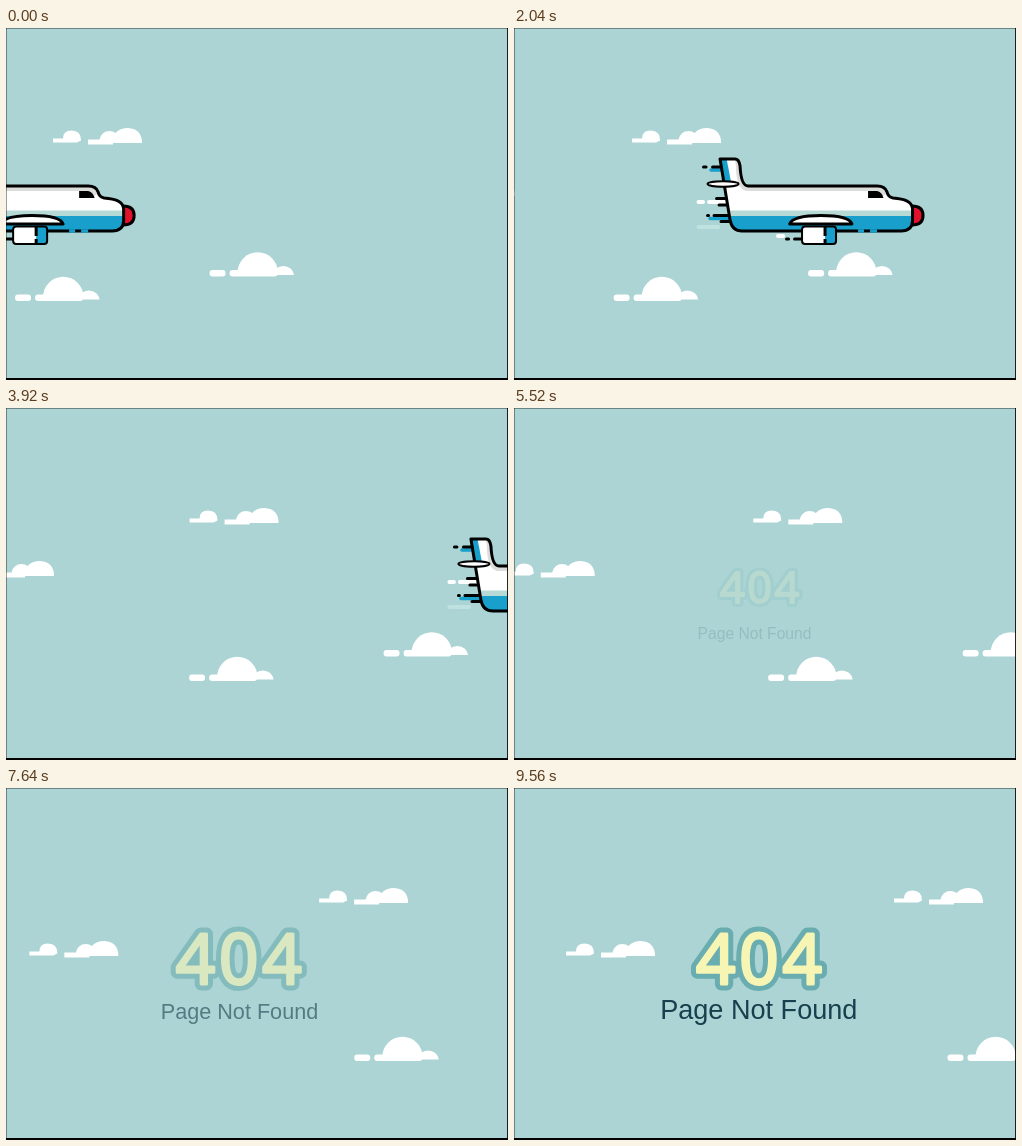
Animation, 502 px wide and 352 px high, one loop 9.6 s. Source, as an HTML page:

```html
<!DOCTYPE html>
<html lang="en">
<head>
<meta charset="utf-8">
<title>Page Not Found</title>
<style>
  html, body { margin: 0; width: 100%; height: 100%; overflow: hidden; background: #acd4d4; }
  svg { display: block; width: 502px; height: 352px; }
  text { text-anchor: middle; }
  .code { font: 69px "Open Sans", sans-serif; letter-spacing: 3.8px; stroke-linejoin: round; }
  .message { font: 27.2px "Liberation Sans", Arial, sans-serif; fill: #163f4e; }
  .line { fill: none; stroke: #000; stroke-width: 3; stroke-linecap: round; stroke-linejoin: round; }
</style>
</head>
<body>
<svg viewBox="0 0 502 352">
  <defs>
    <g id="wisp" fill="#fff">
      <path d="M0 10.5H10Q10 2.5 18.500 2.500Q28 2.500 28 12.500L24 14.500H0Z"/>
      <path d="M35 11.500H46.500Q48.500 3 56.500 3Q60 3 62.500 5Q67 0 75 0Q89 1 89 15H60V16.500H35Z"/>
    </g>
    <g id="puff" fill="#fff">
      <rect y="17.500" width="16" height="6.500" rx="3"/>
      <rect x="20" y="17.500" width="48" height="6.500" rx="3"/>
      <path d="M28 20A20.200 20.200 0 0 1 68.400 20V22H28Z"/>
      <path d="M63 22.500A10.800 10 0 0 1 84.500 22.500Z"/>
    </g>
    <path id="hull" d="M85 131H100Q104 131 105 138Q106 158 113 158H242Q250 158 252 164Q253 169 258 170C269 171 277 173 277.500 181V193Q277 203 266 203H107Q97 203 95 192Z"/>
    <clipPath id="inside"><use href="#hull"/></clipPath>
  </defs>

  <rect width="502" height="352" fill="#acd4d4"/>
  <use id="wispFar" href="#wisp"/>
  <use id="wispNear" href="#wisp"/>
  <use id="puffLow" href="#puff"/>
  <use id="puffHigh" href="#puff"/>

  <g id="plane">
    <g fill="none" stroke-width="3.500" stroke-linecap="round">
      <path stroke="#199fcb" d="M76 142H90M75 190.500H97"/>
      <path stroke="#fff" stroke-width="4" d="M63.500 174H68M74 174H90M143 208H148"/>
      <path stroke="#bfe2e1" stroke-width="4" d="M63.500 199H83"/>
    </g>
    <path d="M277 178Q288 178 288 187.500Q288 197 277 197Z" fill="#e2122d" stroke="#000" stroke-width="3"/>
    <g clip-path="url(#inside)">
      <rect x="80" y="128" width="200" height="78" fill="#fff"/>
      <path d="M99 130Q101 134 101 142Q102 163 113 163H242Q246 163 248 168L260 160L240 150H112L106 130Z" fill="#dcdddb"/>
      <path d="M80 128H91L96 154H80Z" fill="#199fcb"/>
      <rect x="80" y="182.500" width="200" height="5.500" fill="#b7dad7"/>
      <rect x="80" y="188" width="200" height="18" fill="#199fcb"/>
    </g>
    <use href="#hull" class="line"/>
    <path d="M223 203H229M235 203H242" stroke="#199fcb" stroke-width="3.500"/>
    <path d="M233 163H242Q247 164 248.500 170H233Z"/>
    <path class="line" d="M68.500 139H71M77.500 139H86M81.500 170.500H91M84 177H92M72.500 187.500H73.500M79 187.500H93M86 193.500H95M151.500 211H153.500M159.500 211H167"/>
    <ellipse cx="88" cy="156" rx="15.500" ry="2.700" fill="#fff" stroke="#000" stroke-width="2"/>
    <rect x="167" y="199" width="34" height="17" rx="3" fill="#fff"/>
    <path d="M190 199H198Q201 199 201 202V213Q201 216 198 216H190Z" fill="#199fcb"/>
    <path d="M190 199V208M190 211V215" stroke="#000" stroke-width="3"/>
    <rect x="167" y="198.500" width="34" height="17.500" rx="3" fill="none" stroke="#000" stroke-width="2"/>
    <path d="M154.500 196Q158 187.500 186 187.500Q214 187.500 217 196Z" fill="#fff" stroke="#000" stroke-width="2.800" stroke-linejoin="round"/>
  </g>

  <g id="code" class="code">
    <text x="2" y="25" fill="#69adb0" stroke="#69adb0" stroke-width="13">404</text>
    <text x="2" y="25" fill="#f8f6b4" stroke="#f8f6b4" stroke-width="3">404</text>
  </g>
  <text id="message" class="message">Page Not Found</text>

  <path d="M0 .5H502M.5 0V352" stroke="#000" stroke-opacity=".38"/>
  <path d="M501.500 0V352" stroke="#000" stroke-opacity=".85"/>
  <rect y="350" width="502" height="2"/>
</svg>
<script>
  const LOOP = 9600, HALF = 4800, TURN = 7200;
  const part = id => document.getElementById(id);

  // Piecewise linear value through [time, value] keys.
  function track(t, ...keys) {
    let i = 1;
    while (i < keys.length - 1 && t > keys[i][0]) i++;
    const [t0, a] = keys[i - 1], [t1, b] = keys[i];
    return a + (b - a) * (t - t0) / (t1 - t0);
  }

  function place(id, x, y, scale = 1) {
    part(id).setAttribute("transform", `translate(${x} ${y}) scale(${scale})`);
  }

  function draw(t) {
    place("wispFar", 47 + t * 0.03483, 100);
    place("wispNear", track(t, [0, -139], [HALF, -19], [LOOP, 52.6]), 153);
    place("puffLow", 9 + t * 0.0444, 249);
    place("puffHigh", 203.5 + t * 0.0444, 224.5);
    place("plane", t * 0.1377 - 160, 0);

    const fade = Math.max(0, (t - HALF) / (LOOP - HALF));
    part("code").setAttribute("opacity", fade);
    part("message").setAttribute("opacity", fade);
    place("code",
      track(t, [HALF, 252.3], [TURN, 229.7], [LOOP, 245]),
      track(t, [HALF, 183], [TURN, 171], [LOOP, 171]),
      track(t, [HALF, 0.47], [TURN, 1], [LOOP, 1]));
    place("message",
      track(t, [HALF, 244.6], [TURN, 230.9], [LOOP, 245]),
      231, 0.5 + fade / 2);
  }

  function tick() {
    draw(performance.now() % LOOP);
    requestAnimationFrame(tick);
  }
  tick();
</script>
</body>
</html>
```
